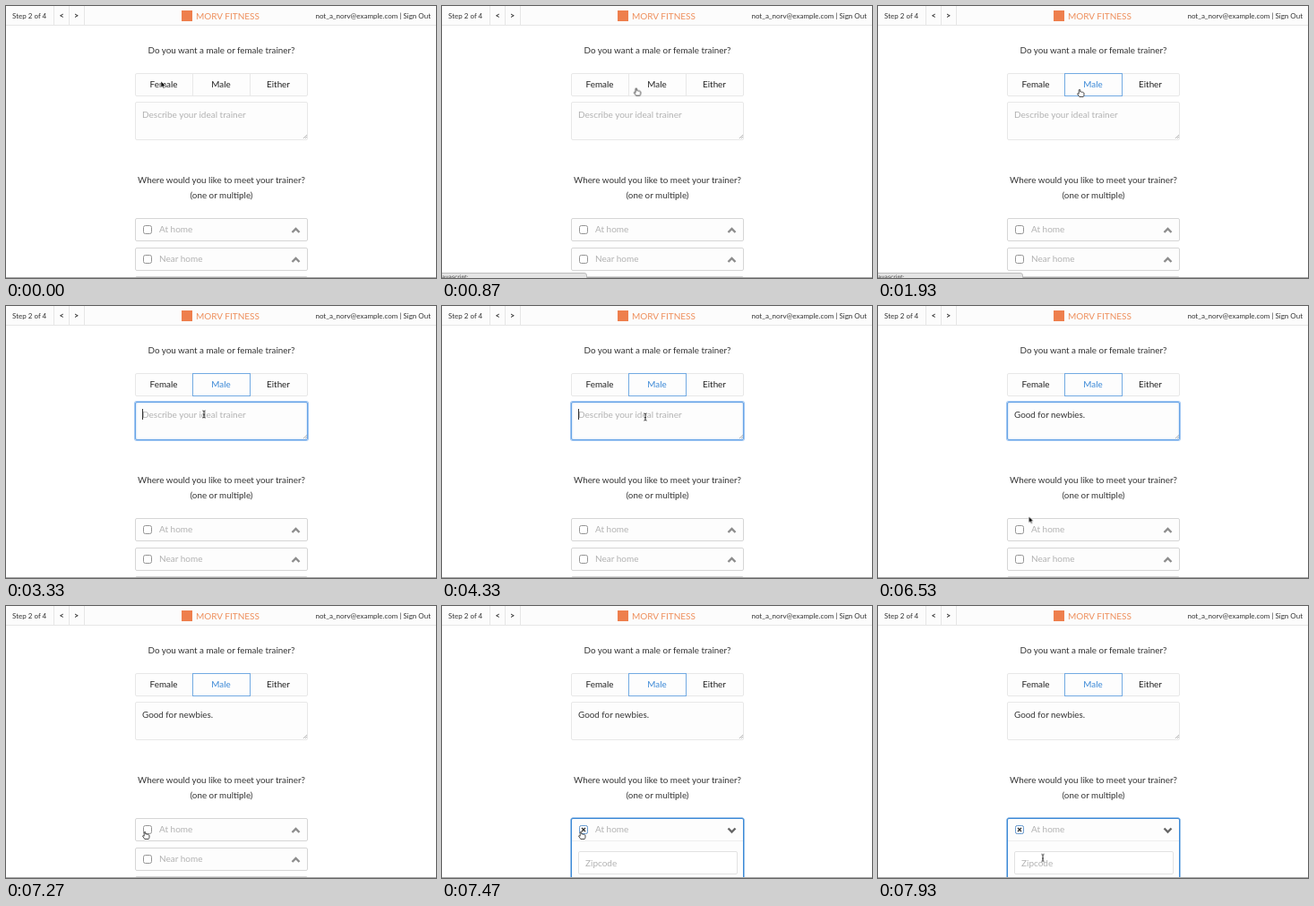
These frames come from a looping animation (480x304 px, 8000 ms). An HTML page:

```html
<!DOCTYPE html>
<html lang="en">
<head>
<meta charset="utf-8">
<title>Trainer preferences</title>
<style>
  html, body { margin: 0; width: 100%; height: 100%; overflow: hidden; background: #fff; }
  #stage { position: relative; width: 480px; height: 304px; overflow: hidden; background: #fff;
    font: 9.85px/12px Lato, "Open Sans", sans-serif; color: #333; --blue: #3a88d6; }
  #stage * { box-sizing: border-box; }
  #stage div, #stage svg, .t { position: absolute; }
  .t { white-space: pre; }
  .mid { left: 0; width: 481px; text-align: center; }
  .soft { color: #b2b2b2; font-size: 10px; }
  .loop, .loop * { animation-duration: 8s; animation-iteration-count: infinite; animation-fill-mode: both; }
  .step { animation-timing-function: step-end; }

  /* header */
  .bar { left: 0; top: 0; width: 480px; height: 22px; background: #fcfcfc; border-bottom: 1px solid #e6e6e6; }
  .bar .t { font-size: 8px; line-height: 10px; top: 6px; }
  .nav { left: 53px; top: 0; width: 35px; height: 21px; border: solid #e6e6e6; border-width: 0 1px; }
  .nav i { position: absolute; left: 16px; top: 0; height: 21px; border-left: 1px solid #e6e6e6; }
  .bar .key { font-weight: bold; font-size: 9px; }
  .logo { left: 196px; top: 5px; width: 12px; height: 12px; background: #ee7f4d; }
  .bar .brand { left: 212px; top: 6px; color: #ee8f5c; font-size: 10px; }

  /* gender buttons */
  .pick { left: 144px; top: 75px; width: 193px; height: 26px; border: 1px solid #e8e8e8; border-radius: 2px; background: #fdfdfd; }
  .pick i { position: absolute; top: 0; height: 24px; border-left: 1px solid #e8e8e8; }
  .cell { top: 81px; width: 64px; text-align: center; color: #222; }
  .male { left: 208px; top: 75px; width: 65px; height: 26px; border: 1px solid transparent; animation-name: pickBox; }
  .maleText { animation-name: pickText; }
  @keyframes pickBox { 0%, 20% { border-color: transparent; } 23%, 100% { border-color: #72aae2; } }
  @keyframes pickText { 0%, 20% { color: #222; } 23%, 100% { color: var(--blue); } }

  /* text area */
  .area { left: 144px; top: 107px; width: 193px; height: 43px; border: 1px solid #e8e8e8; border-radius: 2px; background: #fdfdfd; }
  .ring { left: 144px; top: 107px; width: 193px; height: 43px; border: 1px solid #68a4e6; border-radius: 2px;
    box-shadow: 0 0 0 1px #a3c8f3, inset 0 0 2px #a3c8f3; animation-name: focus; }
  @keyframes focus { 0% { opacity: 0; } 41.5% { opacity: 1; } 90.75%, 100% { opacity: 0; } }
  .hint { animation-name: hint; }
  @keyframes hint { 0% { opacity: 1; } 55.8%, 100% { opacity: 0; } }
  .caret { position: absolute; margin-left: .3px; width: 1px; height: 12px; background: #333; animation-name: caret; }
  @keyframes caret {
    0% { opacity: 0; } 41.5% { opacity: 1; } 47.5% { opacity: 0; } 54.1% { opacity: 1; }
    80.4% { opacity: 0; } 86.6% { opacity: 1; } 90.75%, 100% { opacity: 0; }
  }

  /* places */
  .item { left: 144px; width: 193px; height: 26px; border: 1px solid #d6d6d6; border-radius: 2px; background: #fdfdfd; overflow: hidden; }
  .item .t { left: 26px; top: 5px; }
  .box { left: 7.5px; top: 7px; width: 10px; height: 10px; border: 1px solid #959595; border-radius: 2.5px; background: #fff; }
  .item svg { left: 173px; top: 7.5px; width: 12px; height: 9px; }
  .home { top: 237px; animation-name: grow; }
  @keyframes grow { 0%, 91.2% { height: 26px; } 94.2%, 100% { height: 76px; } }
  .below { left: 0; top: 0; animation-name: slide; }
  @keyframes slide { 0%, 91.2% { transform: none; } 94.2%, 100% { transform: translateY(50px); } }
  .edge { left: 144px; top: 237px; width: 193px; height: 76px; border: 1px solid var(--blue);
    box-shadow: 0 0 0 .5px var(--blue); border-radius: 2px; }
  .on { animation-name: on; }
  .off { animation-name: off; }
  @keyframes on { 0% { opacity: 0; } 91.5%, 100% { opacity: 1; } }
  @keyframes off { 0% { opacity: 1; } 91.5%, 100% { opacity: 0; } }
  .ticked { border-color: #6a9fd6; }
  .item .ticked svg { left: 0; top: 0; width: 8px; height: 8px; }
  .rule { left: 0; top: 24px; width: 191px; height: 1px; background: #eee; }
  .zip { left: 7px; top: 36px; width: 178px; height: 26px; border: 1px solid #e2e2e2; border-radius: 2px; background: #fff; }
  .zip .t { left: 7px; }

  .floor { left: 0; top: 303px; width: 480px; height: 1px; background: #a8a8a8; }
  .status { left: -1px; top: 298px; width: 163px; height: 8px; background: #e4e4e4; border: 1px solid #bcbcbc;
    border-radius: 0 3px 0 0; font: 6px/7px "DejaVu Sans", sans-serif; animation-name: status; }
  .status .t { left: 0; top: 0; }
  @keyframes status { 0%, 5.8% { opacity: 0; } 8.3%, 28% { opacity: 1; } 31.2%, 100% { opacity: 0; } }

  /* pointer */
  .pointer { left: 0; top: 0; animation-name: move; }
  .pointer svg { left: -8px; top: -8px; width: 24px; height: 24px; }
  @keyframes move {
    0%, 4.6% { transform: translate(173px, 84px); animation-timing-function: ease-in-out; }
    13.3%, 24.4% { transform: translate(225px, 93px); animation-timing-function: ease-in-out; }
    30%, 42.6% { transform: translate(221px, 121px); animation-timing-function: ease-out; }
    45%, 77.8% { transform: translate(227px, 124px); animation-timing-function: ease-in-out; }
    81.6% { transform: translate(168.5px, 235px); animation-timing-function: ease-out; }
    88.4%, 95.2% { transform: translate(155px, 252px); animation-timing-function: ease-in-out; }
    99.1%, 100% { transform: translate(184px, 281.5px); }
  }
  .arrow { animation-name: arrow; }
  .hand { animation-name: hand; }
  .beam { animation-name: beam; }
  @keyframes arrow {
    0% { opacity: 1; } 5% { opacity: 0; } 26.3% { opacity: 1; } 27.3% { opacity: 0; }
    79% { opacity: 1; } 82.1% { opacity: 0; } 96.8% { opacity: 1; } 97.6%, 100% { opacity: 0; }
  }
  @keyframes hand {
    0% { opacity: 0; } 5% { opacity: 1; } 26.3% { opacity: 0; } 82.1% { opacity: 1; } 96.8%, 100% { opacity: 0; }
  }
  @keyframes beam {
    0% { opacity: 0; } 27.3% { opacity: 1; } 55.8% { opacity: 0; } 78.3% { opacity: 1; } 79% { opacity: 0; } 97.6%, 100% { opacity: 1; }
  }
</style>
</head>
<body>
<div id="stage" class="loop">
  <div class="bar">
    <span class="t" style="left:7px">Step 2 of 4</span>
    <div class="nav"><i></i></div>
    <span class="t key" style="left:59.5px">&lt;</span>
    <span class="t key" style="left:76px">&gt;</span>
    <div class="logo"></div>
    <span class="t brand">MORV FITNESS</span>
    <span class="t" style="right:6px">not_a_norv@example.com | Sign Out</span>
  </div>

  <span class="t mid" style="top:43px">Do you want a male or female trainer?</span>
  <div class="pick"><i style="left:63px"></i><i style="left:127px"></i></div>
  <div class="male"></div>
  <span class="t cell" style="left:144px">Female</span>
  <span class="t cell maleText" style="left:208px">Male</span>
  <span class="t cell" style="left:272px">Either</span>

  <div class="area"></div>
  <div class="ring step"></div>
  <svg style="left:332px;top:144px" width="4" height="4" stroke="#999" stroke-width=".7"><path d="M0 4L4 0M2 4L4 2"/></svg>
  <span class="t soft hint step" style="left:152px;top:115px">Describe your ideal trainer</span>
  <span class="t" style="left:152px;top:115px"><span id="typed"></span><i class="caret step"></i></span>

  <span class="t mid" style="top:188px">Where would you like to meet your trainer?</span>
  <span class="t mid" style="top:205px">(one or multiple)</span>

  <div class="below">
    <div class="item" style="top:270px">
      <div class="box"></div><span class="t soft">Near home</span>
      <svg fill="none" stroke="#8c8c8c" stroke-width="2.4"><path d="M1.5 7L5.5 3L9.5 7"/></svg>
    </div>
    <div class="item" style="top:302px"></div>
  </div>
  <div class="item home">
    <div class="box"></div>
    <div class="box ticked on step"><svg stroke="#333" stroke-width="1.4"><path d="M2 2L6 6M6 2L2 6"/></svg></div>
    <span class="t soft">At home</span>
    <svg class="off step" fill="none" stroke="#8c8c8c" stroke-width="2.4"><path d="M1.5 7L5.5 3L9.5 7"/></svg>
    <svg class="on step" fill="none" stroke="#666" stroke-width="2.4"><path d="M1.5 2.5L5.5 6.5L9.5 2.5"/></svg>
    <div class="rule on step"></div>
    <div class="zip"><span class="t soft" style="top:6px">Zipcode</span></div>
  </div>
  <div class="edge on step"></div>

  <div class="floor"></div>
  <div class="status"><span class="t">avascript:</span></div>

  <div class="pointer">
    <svg class="arrow step" viewBox="-8 -8 24 24"><path d="M0 0V7.2L1.7 5.7L2.8 8.2L4 7.7L2.9 5.2H5.1Z" fill="#000" stroke="#fff" stroke-width=".6"/></svg>
    <svg class="hand step" viewBox="-8 -8 24 24"><path d="M-.8 .8Q0-.3 .8 .8V3Q2 2.5 2.5 3.3Q3.5 2.8 4 3.7Q5 3.6 5 4.8V6Q5 7.5 4.2 8.5H-.2Q-.9 7.2-2.5 5.4Q-2.5 4-.8 5.2Z" fill="#fff" stroke="#222" stroke-width=".8"/></svg>
    <svg class="beam step" viewBox="-8 -8 24 24"><path d="M-1.6-4Q0-4 0-3V3Q0 4-1.6 4M1.6-4Q0-4 0-3M0 3Q0 4 1.6 4M-1 .8H1" fill="none" stroke="#222" stroke-width=".9"/></svg>
  </div>
</div>
<script>
  const words = "Good for newbies.";
  // time in ms at which each letter is typed
  const keys = [4470, 4670, 4800, 4870, 4930, 5000, 5070, 5130, 5270, 5330, 5400, 5470, 5530, 5670, 5730, 5870, 5930];
  const typed = document.getElementById("typed");
  let start;

  function draw(now) {
    start ??= now;
    const t = (now - start) % 8000;
    const text = words.slice(0, keys.filter(k => k <= t + 8).length);
    if (typed.textContent !== text) typed.textContent = text;
    requestAnimationFrame(draw);
  }
  requestAnimationFrame(draw);
</script>
</body>
</html>
```
